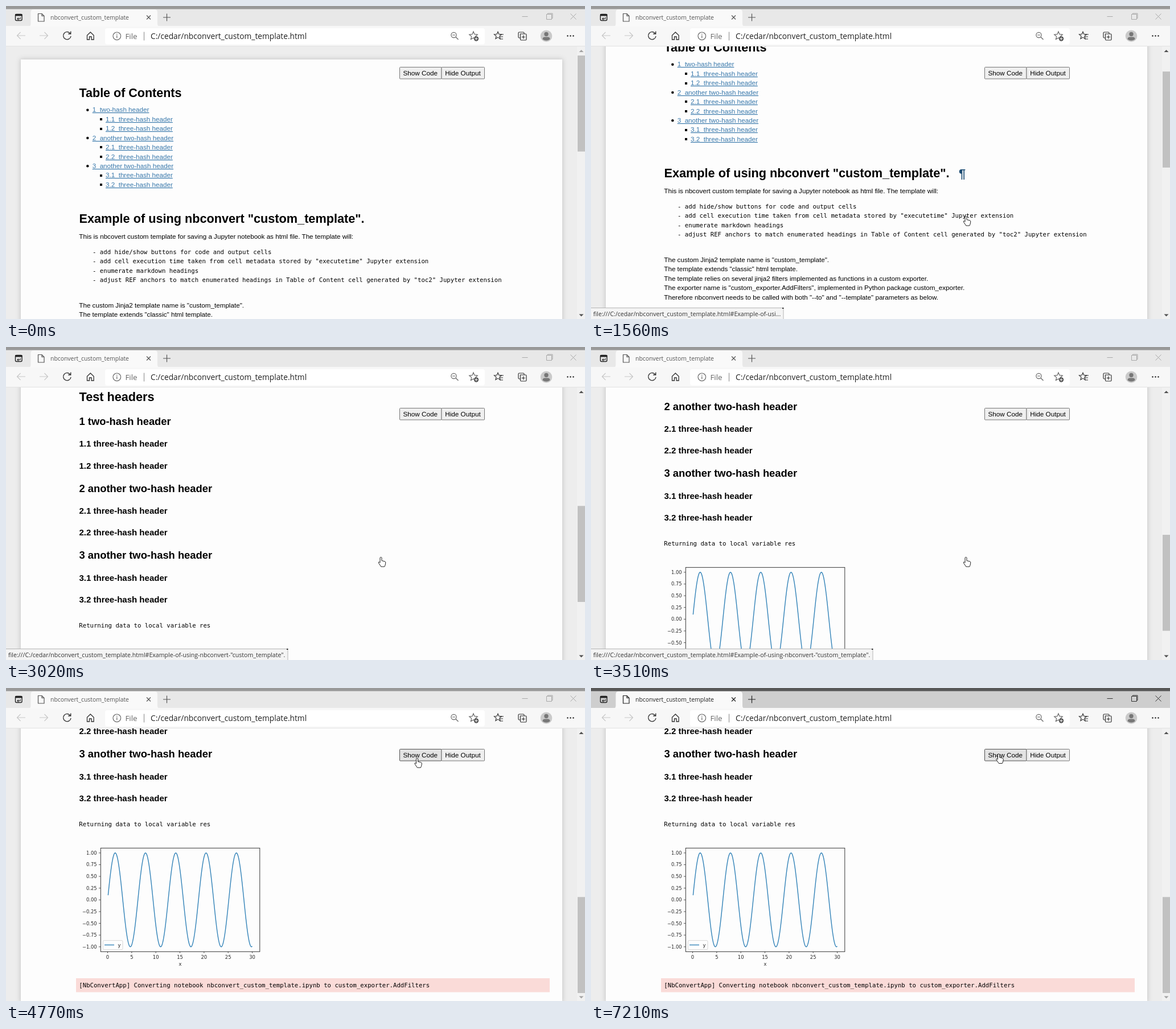
Recreate the animation shown at these times as an HTML page. Size 1017 px wide and 550 px high, loop 8000 ms.

```html
<!DOCTYPE html>
<html lang="en">
<head>
<meta charset="utf-8">
<title>nbconvert_custom_template</title>
<style>
html, body { margin: 0; width: 100%; height: 100%; overflow: hidden; background: #ededed; }
svg { display: block; }
#stage { --strip: #e8e8e8; --edge: #999; --ink: #555; --control: #a9a9a9; font-family: "Liberation Sans", Arial, sans-serif; }
#stage.active { --strip: #cecece; --edge: #575757; --ink: #222; --control: #333; }
text { white-space: pre; }
.ui { font-family: "Open Sans", "Noto Sans", sans-serif; }
.mono { font-family: "DejaVu Sans Mono", monospace; }
.plot { font-family: "DejaVu Sans", sans-serif; fill: #262626; }
.link { fill: #3878ab; text-decoration: underline; }
.bold { font-weight: bold; }
.kw { fill: #008000; font-weight: bold; }
.fn { fill: #008000; }
.op { fill: #666; }
.str { fill: #ba2121; }
.line { fill: none; stroke: #333; stroke-width: 1.2; }
</style>
</head>
<body>
<svg id="stage" width="1017" height="550" viewBox="0 0 1017 550"></svg>
<script>
const LOOP = 8000, STEP = 97.2, BOTTOM = 796;
const stage = document.getElementById('stage');

// y is the middle of the capital letters; baselines sit on whole pixels
const text = (x, y, size, str, attrs = '') =>
  `<text x="${x}" y="${Math.round(y + .355 * size)}" font-size="${size}" ${attrs}>${str}</text>`;
const rect = (x, y, w, h, fill, attrs = '') =>
  `<rect x="${x}" y="${y}" width="${w}" height="${h}" fill="${fill}" ${attrs}/>`;
const line = (d, attrs = '') => `<path class="line" d="${d}" ${attrs}/>`;
const mono = (x, y, str, attrs = '') => text(x, y, 10.66, str, `class="mono" ${attrs}`);
const body = (y, str) => text(128.3, y, 11.65, str);
const heading = (y, size, str) => text(128.5, y, size, str, 'class="bold"');

function contents() {
  const items = ['1  two', '1.1  three', '1.2  three', '2  another two', '2.1  three',
    '2.2  three', '3  another two', '3.1  three', '3.2  three'];
  return items.map((item, i) => {
    const y = 182.3 + 16.42 * i, nested = item[1] === '.';
    const bullet = nested ? rect(165, Math.round(y - 1.5), 4, 4, '#000') : `<circle cx="143.3" cy="${y + .5}" r="2.2"/>`;
    return bullet + text(nested ? 175 : 151.7, y, 11.65, item + '-hash header', 'class="link"');
  }).join('');
}

function intro() {
  const list = ['add hide/show buttons for code and output cells',
    'add cell execution time taken from cell metadata stored by "executetime" Jupyter extension',
    'enumerate markdown headings',
    'adjust REF anchors to match enumerated headings in Table of Content cell generated by "toc2" Jupyter extension'];
  const notes = ['The custom Jinja2 template name is "custom_template".',
    'The template extends "classic" html template.',
    'The template relies on several jinja2 filters implemented as functions in a custom exporter.',
    'The exporter name is "custom_exporter.AddFilters", implemented in Python package custom_exporter.',
    'Therefore nbconvert needs to be called with both "--to" and "--template" parameters as below.'];
  return heading(373.3, 21.68, 'Example of using nbconvert "custom_template".') +
    body(404.5, 'This is nbcovert custom template for saving a Jupyter notebook as html file. The template will:') +
    list.map((s, i) => mono(152, 432 + 16.5 * i, '- ' + s)).join('') +
    notes.map((s, i) => body(525.5 + 16.5 * i, s)).join('');
}

function headers() {
  const out = [heading(633.5, 21.68, 'Test headers')];
  ['1 two', '2 another two', '3 another two'].forEach((title, i) => {
    const y = 676.5 + 117.7 * i;
    out.push(heading(y, 18.37, title + '-hash header'));
    for (const j of [1, 2]) out.push(heading(y + 1.2 + 38.3 * j, 15, `${i + 1}.${j} three-hash header`));
  });
  return out.join('');
}

// Coordinates relative to the top of the plot frame
function plot() {
  const px = x => 178.5 + 8.467 * x, py = y => 91.3 - 82.5 * y;
  let curve = '', out = '';
  for (let i = 1; i <= 300; i++) curve += `${i > 1 ? 'L' : 'M'}${px(i / 10).toFixed(2)} ${py(Math.sin(i / 10)).toFixed(2)}`;
  for (let v = -1; v <= 1; v += .25) {
    out += line(`M163 ${py(v)}h3`, 'style="stroke-width:.8"') +
      text(159.5, py(v), 8.33, v.toFixed(2).replace('-', '\u2212'), 'class="plot" text-anchor="end"');
  }
  for (let v = 0; v <= 30; v += 5) {
    out += line(`M${px(v)} 182v3`, 'style="stroke-width:.8"') +
      text(px(v), 192, 8.33, v, 'class="plot" text-anchor="middle"');
  }
  const blue = 'style="stroke:#3383b8;stroke-width:1.4"';
  return out + line(curve, blue) + rect(166.3, .3, 279.5, 182, 'none', 'stroke="#222" stroke-width=".9"') +
    rect(170.3, 162.7, 34.7, 16, '#fff', 'rx="2" stroke="#ccc" stroke-width=".8" fill-opacity=".8"') +
    line('M173 170.5h17', blue) + text(196.5, 171.5, 8.33, 'y', 'class="plot"') +
    text(306, 204, 8.33, 'x', 'class="plot" text-anchor="middle"');
}

// Marks: *keyword* ~operator~ ^builtin^ |string|
const paint = src => src
  .replace(/\*(.+?)\*/g, '<tspan class="kw">$1</tspan>').replace(/~(.+?)~/g, '<tspan class="op">$1</tspan>')
  .replace(/\^(.+?)\^/g, '<tspan class="fn">$1</tspan>').replace(/\|(.+?)\|/g, '<tspan class="str">$1</tspan>');

const cells = [
  { shut: 1013, open: 1013, run: '1.234s finished : 14:34:45', code: ['~%~*load_ext* sql',
    '~%~*config* SqlMagic.feedback=False', '~%~*config* SqlMagic.feedback=False', '~%~*config* SqlMagic.displaylimit=10'] },
  { shut: 1022, open: 1104, run: '3.398s finished : 14:34:49', code: ['~%%~*sql* oracle://@qtz07k_35 res &lt;&lt;',
    '*SELECT* *LEVEL*~/10~ *as* x, sin(*LEVEL*~/10~) *as* y', '*FROM* dual', '*CONNECT* *BY* *LEVEL* ~&lt;=~ ~300~'] },
  { shut: 1050, open: 1218, run: '6ms finished : 14:34:50', code: ['df=res.DataFrame().astype(^float^)'] },
  { shut: 1062, open: 1268, run: '483ms finished : 14:34:53', code: ["_=df.plot(x=|'x'|)"] }
];

function cell({ code, run }, i) {
  const rule = Math.round(11 + 13.7 * code.length);
  cells[i].height = rule + 16;
  return `<svg class="cell" x="70"><g transform="translate(-70)">` +
    mono(73.5, 12.5, `In [${i + 1}]:`, 'fill="#303f9f"') +
    rect(123.5, .5, 836, rule + 14, '#f7f7f7', 'rx="1.5" stroke="#cfcfcf"') +
    code.map((s, j) => mono(128.5, 12.5 + 13.8 * j, paint(s), 'fill="#222"')).join('') +
    rect(124, rule - 1, 835, 1, '#cfcfcf') + text(124.7, rule + 7.3, 9.3, `executed in : ${run} 2021-03-16`) +
    '</g></svg>';
}

function toolbar() {
  const star = (x, y, r) => 'M' + Array.from({ length: 10 }, (_, i) => {
    const a = Math.PI * (i / 5 - .5), k = i % 2 ? r * .45 : r;
    return `${(x + k * Math.cos(a)).toFixed(1)} ${(y + k * Math.sin(a)).toFixed(1)}`;
  }).join('L') + 'z';
  const faint = 'style="stroke:#c8c8c8"', grey = 'style="stroke:#666"';
  const control = 'style="stroke:var(--control);stroke-width:1"', ink = 'style="stroke:var(--ink)"';
  return rect(0, 0, 1017, 36, 'var(--strip)') + rect(0, 0, 1017, 5.5, 'var(--edge)') +
    rect(0, 35, 1017, 36, '#f7f7f7') + rect(0, 70, 1017, 1, '#e2e2e2') +
    '<path d="M39 36q4.500 0 4.500-5V11q0-5 5-5H261q5 0 5 5V31q0 5 4.500 5z" fill="#f9f9f9"/>' +
    rect(16.5, 14.5, 11.5, 11, 'none', 'rx="2" stroke="#222" stroke-width="1.4"') + rect(16, 14, 12.5, 3.5, '#222', 'rx="1"') +
    line('M25 19.500v3h-5m2-2l-2 2 2 2') +
    line('M56.500 13.500h6.500l4 4V27h-10.500zM63 13.500v4h4', ink) +
    text(78, 20, 10.4, 'nbconvert_custom_template', 'class="ui" fill="var(--ink)"') +
    line('M247 16.500l7 7m0-7l-7 7M276 20h13m-6.500-6.500v13', ink) +
    line('M906.500 18.500h10M949.500 14.500h9v9h-9zM951.500 14.500v-1.500h8.500v8.500h-1.500M991.500 13.500l10 10m0-10l-10 10', control) +
    line('M34 52H19.500m6-6l-6 6 6 6M59 52h14.500m-6-6l6 6-6 6', faint) +
    line('M113 48.500a6.700 6.700 0 1 0 1 4.500M113.700 44.500v4.500h-4.500', 'style="stroke-width:1.4"') +
    line('M142.500 51.500l5.800-5.500 5.800 5.500v7.500h-4v-5h-3.600v5h-4z', 'style="stroke-width:1.3"') +
    rect(174, 39, 667, 28.5, '#fff', 'rx="4"') +
    `<circle class="line" cx="194.800" cy="52.800" r="6.800" ${grey}/>` + line('M194.800 51.500v5M194.800 48.800v1.400', grey) +
    text(209.5, 53.5, 13.3, 'File', 'class="ui" fill="#666"') + rect(242, 45.5, 1, 15, '#888') +
    text(254, 53.5, 13.75, 'C:/cedar/nbconvert_custom_template.html', 'class="ui" fill="#222"') +
    `<circle class="line" cx="786.500" cy="51" r="4.600" ${grey}/>` + line('M790 54.500l4.500 4.500M784 51h5', grey) +
    line(star(821, 52.5, 7.6), grey) + '<circle cx="826" cy="57.500" r="4.200" fill="#555"/>' +
    line('M823.500 57.500h5m-2.500-2.500v5', 'style="stroke:#fff;stroke-width:1"') +
    line(star(864, 52, 6.8)) + line('M867 50h7M867 54h6M867 58h6') +
    line('M903 56h-1.500q-1.500 0-1.500-1.500v-7q0-1.500 1.500-1.500h7q1.500 0 1.500 1.500v1.500M903.500 49h9q1.500 0 1.500 1.500v8q0 1.500-1.500 1.500h-7.500q-1.500 0-1.500-1.500zM908.700 51.500v6m-3-3h6') +
    '<circle cx="949" cy="52.800" r="10.300" fill="#cacaca"/><circle cx="949" cy="49.500" r="3.700" fill="#777"/>' +
    '<path d="M942.500 58.500q0-4 4-4h5q4 0 4 4-6.500 4.500-13 0z" fill="#777"/>' +
    [986.5, 991.5, 996.5].map(x => `<circle cx="${x}" cy="52.500" r="1.200" fill="#222"/>`).join('');
}

stage.innerHTML =
  '<defs><filter id="soft" x="-5%" y="-5%" width="110%" height="110%"><feGaussianBlur stdDeviation="4"/></filter></defs>' +
  rect(0, 0, 1017, 550, '#ededed') +
  '<g id="page"><rect id="shade" x="25" y="93" width="953" fill="#575757" opacity=".25" filter="url(#soft)"/>' +
  '<rect id="paper" x="26" y="94" width="951" fill="#fdfdfd"/>' +
  heading(152, 21.5, 'Table of Contents') + contents() + intro() +
  text(646, 374, 21.68, '¶', 'id="pilcrow" class="bold" fill="#1f4e74"') +
  headers() + cells.map(cell).join('') +
  `<g id="result">${mono(128.3, 0, 'Returning data to local variable res')}</g><g id="plot">${plot()}` +
  rect(123, 229, 832, 24.5, '#fadbd8') +
  mono(128.3, 241.3, '[NbConvertApp] Converting notebook nbconvert_custom_template.ipynb to custom_exporter.AddFilters') + '</g></g>' +
  '<g id="buttons"><rect id="toggle" y="107.500" height="20.500" rx="1"/>' + text(0, 117.5, 11.7, '', 'id="label"') +
  rect(765, 107.5, 75.5, 20.5, '#efefef', 'rx="1" stroke="#767676"') + text(771.3, 117.5, 11.7, 'Hide Output') + '</g>' +
  rect(1003, 71, 14, 479, '#f1f1f1') + '<rect id="thumb" x="1004" width="13" fill="#c1c1c1"/>' +
  '<path id="up" d="M1006.500 81l4-4 4 4z"/><path id="down" d="M1006.500 541.500l4 4 4-4z"/>' + toolbar() +
  '<svg id="status" y="530" height="20"><rect id="bubble" x="-4" y=".500" height="30" rx="3" fill="#f4f4f4" stroke="#b5b5b5"/>' +
  rect(0, 0, 2.5, 2, '#333', 'id="corner"') + text(4, 11.5, 10.6, '', 'id="address" class="ui" fill="#333"') + '</svg>' +
  '<g id="cursor" fill="#fff" stroke="#222" stroke-width="1" stroke-linejoin="round">' +
  '<path id="hand" d="M-1.500 8.500V1.300a1.500 1.500 0 0 1 3 0V6l5 1.200q2 .5 1.800 2.500l-.8 4.300-1.200 2.500H.3L-3 11.500q-2-2.300-.9-3.100 1-.6 2.400 1.100z"/>' +
  '<path id="arrow" d="M0 0v13l3-2.800 2.200 5 2-1-2.200-4.700h4.200z"/></g>';

const el = {};
for (const node of stage.querySelectorAll('[id]')) el[node.id] = node;
const cellNodes = [...stage.querySelectorAll('.cell')];
const set = (node, attrs) => { for (const k in attrs) node.setAttribute(k, attrs[k]); };
const move = (node, x, y) => node.setAttribute('transform', `translate(${x} ${y})`);
const mix = (a, b, p) => a + (b - a) * p;

function at(keys, t) {
  const i = keys.findIndex(k => k[0] > t);
  if (i < 0) return keys[keys.length - 1][1];
  if (i === 0) return keys[0][1];
  const [a, b] = [keys[i - 1], keys[i]];
  return mix(a[1], b[1], (t - a[0]) / (b[0] - a[0]));
}

// Page offset at each step: two flicks, a long glide, then a bounce at the bottom
const SCROLL_START = 7;
const SCROLL = [2, 8, 20, 40, 62, 76, 80, 80, 85, 99, 125, 165, 216, 280, 370, 460, 529, 541, 545, 546,
  546, 546, 553, 572, 604, 645, 690, 735, 773, 796, 814, 822, 818, 808, 800, BOTTOM];
const CURSOR_X = [[300, 662], [490, 658.5], [4290, 658.5], [4480, 685], [4680, 725], [4960, 716]];
const CURSOR_Y = [[300, 376], [490, 369.5], [4290, 369.5], [4390, 335], [4580, 180], [4680, 127], [4960, 116]];
const STATUS_WIDTH = [[1950, 338], [2150, 495]];
const STATUS_ALPHA = [[300, 0], [490, .9], [680, 1], [4280, 1], [4480, 0]];
const UNFOLD = [[5260, 0], [5640, 1], [6640, 1], [7130, 0]];
const swing = p => .5 - Math.cos(p * Math.PI) / 2;

function scrollAt(step) {
  const i = step - SCROLL_START;
  return i < 0 ? 0 : SCROLL[Math.min(i, SCROLL.length - 1)];
}

function draw(now) {
  const time = now % LOOP;
  const step = Math.floor((time - 290) / STEP);
  const t = time < 300 ? 0 : 300 + STEP * step;
  const scroll = scrollAt(step), over = Math.max(0, scroll - BOTTOM), top = scroll - over;
  const p = swing(at(UNFOLD, t)), total = mix(1275, 1554, p);

  move(el.page, 0, -scroll);
  set(el.paper, { height: total - 21 });
  set(el.shade, { height: total - 19 });
  move(el.result, 0, mix(1035, 1197, p));
  move(el.plot, 0, mix(1077, 1318, p));
  cells.forEach((c, i) => set(cellNodes[i], {
    y: mix(c.shut, c.open, p), width: 890 * p, height: c.height * p, opacity: p, display: p > .001 ? 'inline' : 'none'
  }));
  set(el.thumb, { y: 87 + 449 * top / total, height: 449 * 479 / total });
  set(el.up, { fill: top < 1 ? '#a3a3a3' : '#505050' });
  set(el.down, { fill: top + 479 > total - 1 ? '#a3a3a3' : '#505050' });

  const x = at(CURSOR_X, t), y = at(CURSOR_Y, t), hover = t > 4600;
  const shown = t > 5250 && t < 6600, left = shown ? 696.5 : 691.5;
  move(el.buttons, 0, -over);
  set(el.toggle, { x: left, width: 765 - left, fill: hover ? '#e3e3e3' : '#efefef', stroke: hover ? '#4f4f4f' : '#767676' });
  set(el.label, { x: left + 6 });
  el.label.textContent = shown ? 'Hide Code' : 'Show Code';

  stage.classList.toggle('active', t > 5250);
  set(el.pilcrow, { visibility: t >= 300 ? 'visible' : 'hidden' });
  move(el.cursor, x, y);
  set(el.cursor, { visibility: t >= 300 ? 'visible' : 'hidden' });
  const pointing = t < 4300 || hover;
  set(el.hand, { display: pointing ? 'inline' : 'none' });
  set(el.arrow, { display: pointing ? 'none' : 'inline' });

  const width = at(STATUS_WIDTH, t);
  set(el.status, { width: width + 1, opacity: at(STATUS_ALPHA, t) });
  set(el.bubble, { width: width + 4 });
  set(el.corner, { x: width - 2 });
  el.address.textContent = 'file:///C:/cedar/nbconvert_custom_template.html#Example-of-usi' +
    (width > 338 ? 'ng-nbconvert-"custom_template".' : '...');
}

const start = performance.now();
function frame() {
  draw(performance.now() - start);
  requestAnimationFrame(frame);
}
frame();
</script>
</body>
</html>
```
